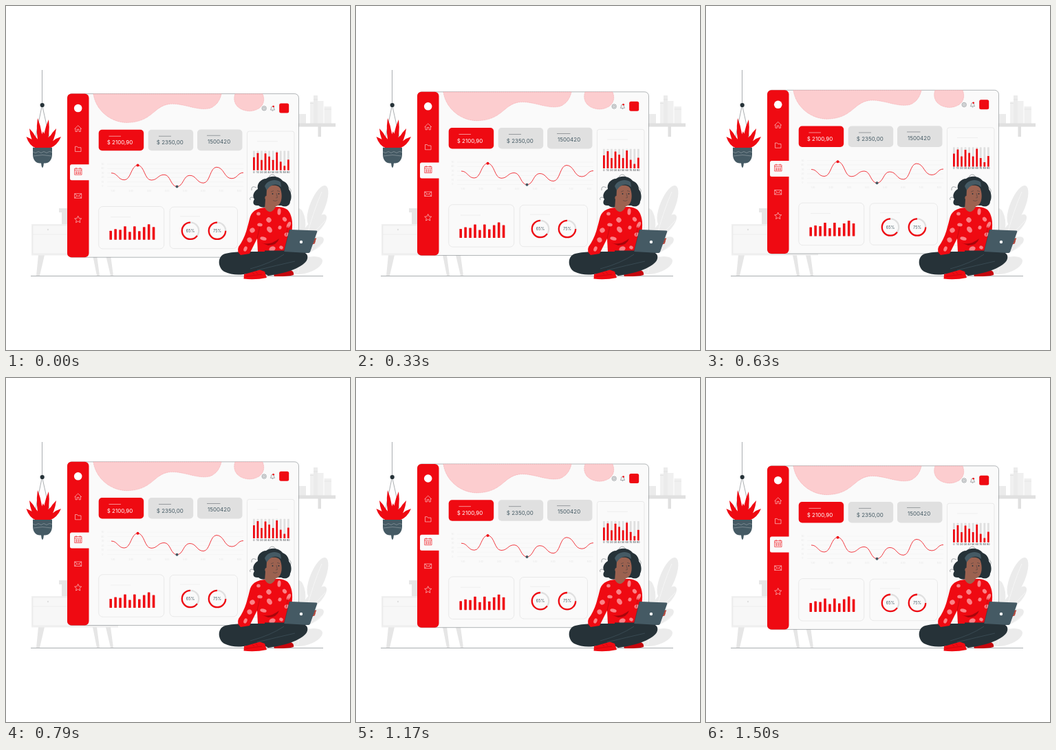
Recreate the animation shown at these times as an HTML page. Size 500 px wide and 500 px high, loop 1.54 s.

```html
<!DOCTYPE html>
<html lang="en">
<head>
<meta charset="utf-8">
<title>Dashboard</title>
<style>
  html, body { margin: 0; width: 100%; height: 100%; overflow: hidden; background: #fff; }
  svg { display: block; width: 100%; height: 100%; }
  text { font-family: Inter, Montserrat, sans-serif; }
  .red { fill: #ef0a12; }
  .dark { fill: #263238; }
  .slate { fill: #455a64; }
  .skin { fill: #9c6250; }
  .grey { fill: #e0e0e0; }
  .white { fill: #fff; }
  .line { fill: none; stroke: #263238; stroke-width: .4; }
  .thin { fill: none; stroke: #fff; stroke-width: .55; stroke-linejoin: round; }
  .card { fill: #fafafa; stroke: #dedede; stroke-width: .6; }
  .faint { fill: none; stroke: #e6e6e6; stroke-width: .6; }
  .tiny { font-size: 3px; fill: #e3e3e3; text-anchor: middle; }
</style>
</head>
<body>
<svg viewBox="0 0 500 500">
  <!-- cabinet -->
  <g fill="#e6e6e6">
    <path d="M47 362H56L49 392H44ZM126 362H132L136 392H132ZM145 362H152L156 392H152Z"/>
    <path d="M77 294H95V300H77ZM81 300H95V317H81Z"/>
  </g>
  <rect x="37" y="317" width="126" height="45.5" fill="#f0f0f0"/>
  <rect x="39" y="319" width="60" height="41" fill="#f7f7f7" stroke="#e8e8e8" stroke-width=".6"/>
  <path d="M39 332H99" class="faint"/>
  <circle cx="61" cy="325" r="1.2" class="grey"/>

  <!-- shelf -->
  <g fill="#ebebeb">
    <path d="M426 157H436V171H426ZM447 130H453V171H447Z"/>
    <path d="M442 139H447V171H442ZM453 138H461.5V171H453ZM462.5 146H473V171H462.5Z" fill="#f0f0f0"/>
    <path d="M442 141.5H447M447 136H453M462.5 150H473" stroke="#dedede" stroke-width=".7"/>
    <path d="M425 170.5H479V175.5H458V190H453.5V175.5H425Z" class="grey"/>
  </g>

  <!-- big leaves -->
  <g fill="#ebebeb">
    <ellipse cx="453" cy="290" rx="11" ry="31" transform="rotate(22 453 290)"/>
    <ellipse cx="448" cy="321" rx="9" ry="24" transform="rotate(45 448 321)"/>
    <ellipse cx="446" cy="347" rx="8" ry="18" transform="rotate(58 446 347)"/>
    <ellipse cx="436" cy="377" rx="11" ry="25" transform="rotate(72 436 377)"/>
    <ellipse cx="428" cy="312" rx="7" ry="18" transform="rotate(-8 428 312)"/>
  </g>
  <path d="M424 388C432 355 440 315 459 270M426 372L460 345M430 348L464 312" stroke="#fafafa" stroke-width=".7" fill="none"/>
  <path d="M36 392.5H461" class="line"/>

  <g id="panel">
    <rect x="89.5" y="127.800" width="336" height="237.700" rx="6" fill="#fafafa" stroke="#263238" stroke-width=".35"/>
    <g fill="#fccdcf" stroke="#f0858b" stroke-width=".4" stroke-dasharray="1 .5">
      <path d="M127 128C130 150 150 169.5 176 169.700C212 169 214 147 236 143C256 140 276 153 296 149C305 146 311 138 313 128Z"/>
      <path d="M333 128C329 138 334 152 354 153C372 152 378 140 373 128Z"/>
    </g>
    <rect x="89" y="127.800" width="31.5" height="237.700" rx="6" class="red"/>
    <path d="M121 230.5H95.5Q93 230.5 93 233V251Q93 253.5 95.5 253.5H121Z" fill="#fafafa"/>
    <circle cx="104.700" cy="148.800" r="5.800" class="white"/>
    <g class="thin">
      <path d="M99.5 179L104.700 174L110 179M101 178V182.800H103.400V179.5H106V182.800H108.400V178"/>
      <path d="M100.5 204.5H103.5L104.700 206H109V211.800H100.5Z"/>
      <path d="M99.700 273H109.700V279.5H99.700ZM99.700 273L104.700 277L109.700 273M99.700 279.5L103.300 276M109.700 279.5L106.100 276"/>
      <path d="M104.700 305.5L106.200 308.800L109.700 309.200L107.100 311.5L107.800 315L104.700 313.200L101.600 315L102.300 311.5L99.700 309.200L103.200 308.800Z"/>
      <g stroke="#ef0a12">
        <path d="M99.700 236.5H110V245.5H99.700ZM99.700 239H110M102 235V237.5M107.700 235V237.5" stroke-width=".65"/>
        <path d="M101.5 241.300H108.5M101.5 243.5H108.5" stroke-width="1.300" stroke-dasharray="1.5 1.2"/>
      </g>
    </g>

    <g class="line">
      <circle cx="375.200" cy="149" r="3.200"/>
      <circle cx="375.200" cy="149" r="1.5"/>
      <path d="M384.5 151.300C386 149.5 384.800 146 387.5 146C390 146 389 149.5 390.5 151.300ZM386.700 152.5H388.300"/>
    </g>
    <circle cx="388.700" cy="146.300" r="1.300" class="red"/>
    <rect x="397.200" y="141.700" width="14" height="14" rx="2.5" class="red"/>

    <rect x="134.700" y="180" width="65.5" height="30.5" rx="5" class="red"/>
    <rect x="206.700" y="180" width="65.5" height="30.5" rx="5" class="grey"/>
    <rect x="278" y="179.700" width="65.5" height="30.800" rx="5" class="grey"/>
    <path d="M149.5 189.5H167" class="thin"/>
    <path d="M222 189.5H240M292 188.5H311.5" class="line"/>
    <g font-size="8">
      <text x="146.700" y="201.600" class="white">$ 2100,90</text>
      <text x="218.800" y="201.600" class="slate">$ 2350,00</text>
      <text x="293" y="200.300" class="slate">1500420</text>
    </g>

    <g id="chart"></g>

    <rect x="134.700" y="291.700" width="95" height="61.5" rx="6" class="card"/>
    <rect x="238" y="292.300" width="98.5" height="60.5" rx="6" class="card"/>
    <rect x="350.5" y="182.300" width="68.5" height="171" rx="3" class="card"/>
    <path d="M152 307H181M253 306H282M365 197H395" class="faint"/>
    <g id="bars"></g>
    <g id="gauges"></g>
  </g>

  <!-- hanging plant -->
  <path d="M52.5 93V143M52.5 144L39.5 207M52.5 144L66.5 207" class="line"/>
  <circle cx="52.700" cy="144" r="3.100" class="dark"/>
  <path id="spikes" class="red"/>
  <path d="M39 206H67V216C67 224 62 228.5 57 228.5H49C44 228.5 39 224 39 216ZM51 228H55L54.300 233L53 235.5L51.700 233Z" class="slate"/>
  <path d="M39 212L43 213.5L47 211.5L51 213.5L55 211.5L59 213.5L63 211.5L67 212.5M40 218Q53 215 66 218" class="thin" opacity=".5"/>

  <!-- woman -->
  <g>
    <path d="M378 251C386 245 398 248 402 254C409 257 411 262 411 266C416 273 415 281 413 284C413 291 405 293 400 290H381C378 294 370 293 367 290C359 291 358 285 361 281C357 275 361 269 366 266C364 258 371 251 378 251Z" class="dark"/>
    <path d="M381 250Q386 241 392 248M364 264Q356 260 357 268M361 279Q353 276 355 282M411 264Q416 267 413 273" class="line" stroke-width=".8"/>
    <path d="M377 281H392V296Q392 304 383.5 304Q376 304 376 296Z" class="skin"/>
    <path d="M379 266C382 259 397 259 399 266C402 275 401 285 396 289.5C391 293 383 290 380 284C376 283 375 276 378.5 276Z" class="skin"/>
    <path d="M376 262C379 254 391 250 399 256L400 263C392 257 385 259 379 268Z" class="slate"/>
    <path d="M385 270L389 268.5M394 268.5L398 269.5M393 272L394.5 278.5L392 279M388 282.5Q391 284.5 394.5 282.5" class="line" stroke-width=".8"/>
    <circle cx="387.5" cy="273" r=".9" class="dark"/>
    <circle cx="396.5" cy="273" r=".9" class="dark"/>

    <path d="M388 386L414 384Q419 386 418 391Q408 393.5 390 393Z" fill="#c5060d"/>
    <path d="M366 357C346 357 325 357 316 361C307 366 308 380 317 386C333 394 352 390 368 385L381 392C403 389 429 382 437 370C441 362 436 357 426 357Z" class="dark"/>
    <path d="M346 390L369 383.5L376 386L379 395Q362 398.5 345.5 396.5Z" class="red"/>
    <path d="M349 393L372 390M358 387.5L361 390M363 386L366 389.5" stroke="#a9050b" stroke-width=".5"/>
    <path d="M355 382Q385 374 404 361M365 384Q393 377 420 371" fill="none" stroke="#455a64" stroke-width=".6"/>

    <path d="M376 293C367 294 359 296 355 306C351 320 349 335 338 350Q335 357 341 362L354 360L365 338L366 357H410L415 330C418 314 415 302 409 296C403 292 398 292 392 292Q384 306 376 293Z" class="red"/>
    <g id="spots" fill="#fb8186"></g>
    <path d="M371 344Q383 349 397 338Q394 348 381 348Z" fill="#a9050b"/>
    <path d="M365 338L369 320M410 320L407 334" fill="none" stroke="#b8060d" stroke-width=".7"/>
    <path d="M445 339L451 337L449 345L444 347Z" class="skin"/>
    <path d="M446 340L451 338.5M446 343L450 341.5M445 346L449 344.5" stroke="#ef0a12" stroke-width=".7"/>
    <path d="M376 355.5H404L440 357.5V359H376Z" class="dark"/>
    <path d="M412 325L451 326.5Q453 327 452 329L442 357.5Q441 359 439 359L404 357Z" class="slate"/>
    <path d="M412 325L404 357" class="line"/>
    <circle cx="429" cy="343" r="2.200" class="white"/>
  </g>
</svg>
<script>
  const get = id => document.getElementById(id);
  const bar = (x, top, base, width, cls) =>
    `<rect x="${x}" y="${top}" width="${width}" height="${base - top}" rx=".6" class="${cls}"/>`;

  // Line chart: smooth curve with level tangents at its turning points
  const points = [[153, 243], [172, 253], [191.5, 231.7], [211, 253.3], [230, 245.5],
    [248.5, 262.7], [267, 246.5], [287, 257.5], [306, 234.5], [328, 251], [345, 242.5]];
  const curve = points.map(([x, y], i) => {
    if (!i) return `M${x} ${y}`;
    const [px, py] = points[i - 1], mid = (px + x) / 2;
    return `C${mid} ${py} ${mid} ${y} ${x} ${y}`;
  }).join('');
  let chart = '';
  for (let i = 0; i < 6; i++) {
    const y = 230 + i * 6.5;
    chart += `<path d="M147 ${y}H345" class="faint" opacity=".45"/>
      <text x="140.5" y="${y + 1}" class="tiny">${50 - i * 10}</text>`;
  }
  for (let i = 0; i < 8; i++)
    chart += `<text x="${155.5 + i * 26.2}" y="270.5" class="tiny">${i + 1}:00</text>`;
  get('chart').innerHTML = chart + `<path d="${curve}" fill="none" stroke="#ef0a12" stroke-width=".8"/>
    <circle cx="191.5" cy="231.7" r="2" class="red"/><circle cx="248.5" cy="262.7" r="2" class="slate"/>`;

  const heights = [13, 15.5, 14.5, 19.5, 11.5, 19.5, 12.5, 18.5, 22.5, 18.5];
  const levels = [19, 25, 15, 24.5, 20, 15, 26, 12.5, 6.5, 15.5];
  get('bars').innerHTML =
    heights.map((h, i) => bar(150.4 + i * 6.93, 340 - h, 340, 3.6, 'red')).join('') +
    levels.map((h, i) => {
      const x = 359 + i * 5.55;
      return bar(x, 210.8, 239, 2.8, 'grey') + bar(x, 239 - h, 239, 2.8, 'red') +
        `<text x="${x + 1.4}" y="242.8" font-size="3.6" text-anchor="middle" class="dark">${i * 10}</text>`;
    }).join('');

  get('gauges').innerHTML = [[268, 65], [307, 75]].map(([x, value]) => `
    <g fill="none" stroke-width="2.3" transform="translate(${x} 327) scale(-1 1) rotate(-90)">
      <circle r="12.2" stroke="#e0e0e0"/>
      <circle r="12.2" stroke="#ef0a12" pathLength="100" stroke-dasharray="${value} 100"/>
    </g>
    <text x="${x}" y="329.2" font-size="5.6" text-anchor="middle" class="slate">${value}%</text>`).join('');

  // Straight pointed leaves fanning out of the pot
  const tips = [[29.5, 190], [34, 178], [46, 163], [62, 165], [73, 178], [80, 190], [40, 188], [54, 182], [66, 187]];
  get('spikes').setAttribute('d', tips.map(([x, y]) => {
    const root = 53 + (x - 53) * .3, midX = (x + root) / 2, midY = (y + 207) / 2;
    const length = Math.hypot(x - root, y - 207);
    const dx = 6 * (207 - y) / length, dy = 6 * (x - root) / length;
    return `M${root - 2} 207Q${midX - dx} ${midY - dy} ${x} ${y}Q${midX + dx} ${midY + dy} ${root + 2} 207Z`;
  }).join(''));

  const spots = [[367, 302], [382, 311], [397, 299], [405, 310], [369, 318], [383, 325], [398, 322],
    [358, 326], [374, 338], [408, 332], [348, 353], [387, 353], [400, 351], [354, 340], [411, 318]];
  get('spots').innerHTML = spots.map(([x, y], i) =>
    `<ellipse cx="${x}" cy="${y}" rx="${2.8 + i % 3}" ry="${2.5 + i % 2}" transform="rotate(${i * 47} ${x} ${y})"/>`).join('');

  // The panel floats up and down at constant speed
  const LOOP = 1540, LIFT = 6.4, LEAD = 30;
  const start = performance.now();
  function draw(now) {
    const phase = (Math.max(0, now - start) + LEAD) % LOOP / LOOP;
    const lift = LIFT * (1 - Math.abs(1 - 2 * phase));
    get('panel').setAttribute('transform', `translate(0 ${-lift})`);
    requestAnimationFrame(draw);
  }
  draw(start);
</script>
</body>
</html>
```
